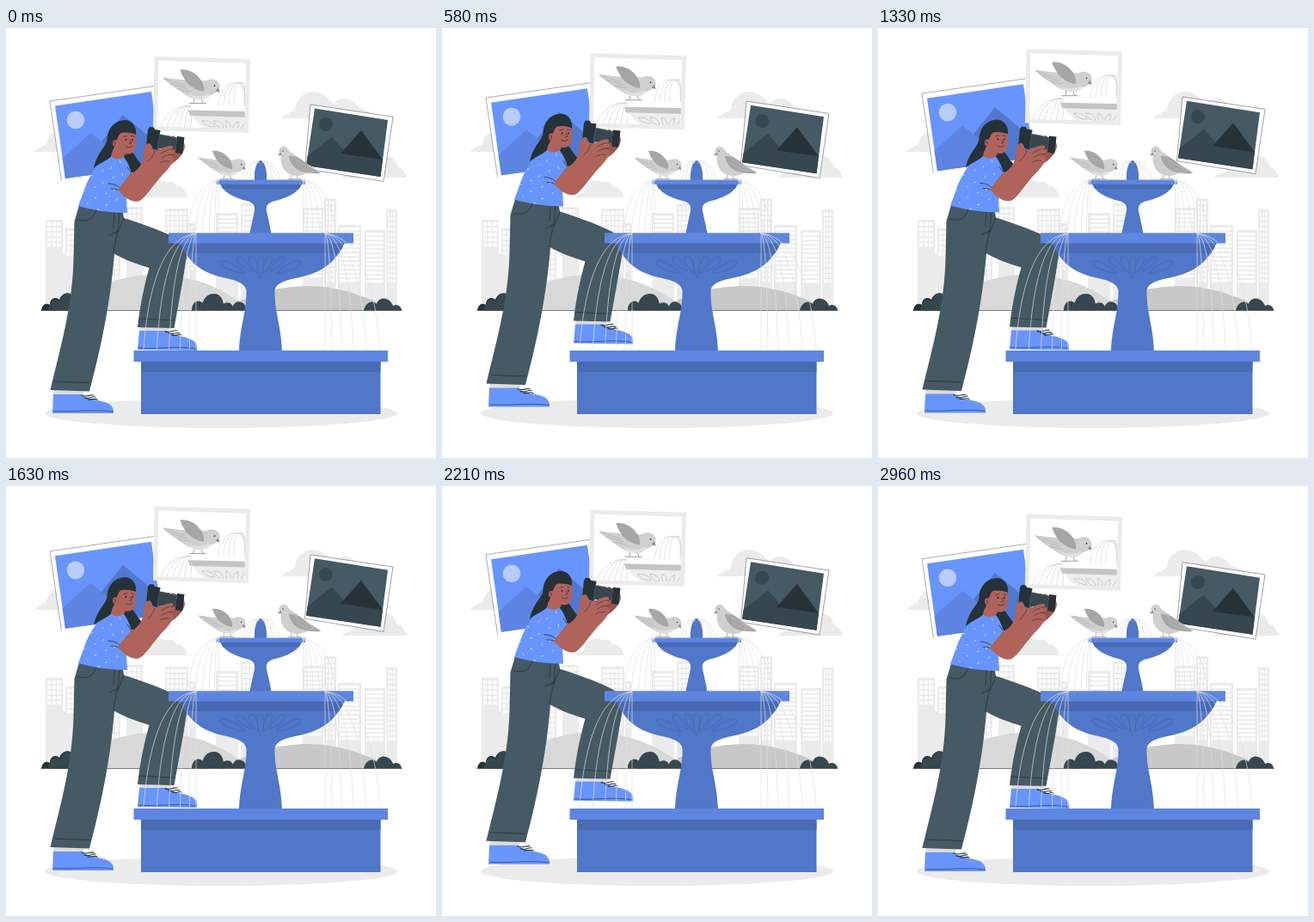
An HTML page with a canvas for the animation above (3 s loop, 500 by 500 pixels).

```html
<!DOCTYPE html>
<html lang="en">
<head>
<meta charset="utf-8">
<title>Photographer at the fountain</title>
<style>
html, body { margin: 0; width: 100%; height: 100%; overflow: hidden; background: #fff; }
canvas { display: block; width: 100%; height: 100%; }
</style>
</head>
<body>
<canvas id="stage"></canvas>
<script>
const canvas = document.getElementById('stage');
const ctx = canvas.getContext('2d');
const ratio = Math.max(1, window.devicePixelRatio || 1);
canvas.width = canvas.height = 500 * ratio;

const LOOP = 3000;
const PALE = '#ebebeb', DARK = '#263238', SLATE = '#37474f', PANTS = '#455a64';
const BLUE = '#6895fd', RIM = '#5e86e0', STONE = '#5077c8', SHADE = '#486bb4';
const SKIN = '#b0635b', WATER = '#e0e0e0';

const cache = {};
const path = d => cache[d] || (cache[d] = new Path2D(d));
function fill(color, d) { ctx.fillStyle = color; ctx.fill(path(d)); }
function line(color, width, d) {
  ctx.strokeStyle = color;
  ctx.lineWidth = width;
  ctx.lineCap = ctx.lineJoin = 'round';
  ctx.stroke(path(d));
}
function rect(color, x, y, w, h) { ctx.fillStyle = color; ctx.fillRect(x, y, w, h); }
function oval(color, x, y, rx, ry = rx) {
  ctx.fillStyle = color;
  ctx.beginPath();
  ctx.ellipse(x, y, rx, ry, 0, 0, Math.PI * 2);
  ctx.fill();
}
function group(dx, dy, draw, clip) {
  ctx.save();
  ctx.translate(dx, dy);
  if (clip) ctx.clip(path(clip));
  draw();
  ctx.restore();
}

// Building with a grid of white windows over a solid foot
function building(x, y, w, cols, rows, step, gap) {
  rect(PALE, x, y, w, 328 - y);
  const cell = (w - 3) / cols;
  for (let r = 0; r < rows; r++)
    for (let c = 0; c < cols; c++)
      rect('#fff', x + 2 + c * cell, y + 3 + r * step, cell - 1.5, step - gap);
}

function clouds() {
  fill(PALE, 'M33 144C36 139 43 138 47 135C49 124 57 119 66 121C78 105 98 110 102 124L120 144Z');
  fill(PALE, 'M155 197C158 192 163 193 165 191C167 180 177 173 187 180C191 177 196 179 198 184C204 183 211 190 211 197Z');
  fill(PALE, 'M320 105C324 99 331 99 336 95C337 77 356 68 371 79C376 83 378 86 381 88C389 78 404 81 409 92C416 95 427 98 433 105Z');
  fill(PALE, 'M391 174C394 169 402 169 406 166C409 150 424 141 440 148C450 148 454 155 455 161C461 163 465 169 466 174Z');
}

function city() {
  rect(PALE, 46, 262, 74, 66);
  building(46, 223, 20, 3, 5, 6, 1.8);
  building(69, 233, 13, 2, 5, 6, 1.8);
  building(120, 225, 13, 2, 11, 6, 1.8);
  building(140, 208, 19, 3, 6, 6, 1.8);
  building(185, 210, 27, 5, 12, 6, 1.8);
  building(213, 227, 7, 1, 9, 6, 1.8);
  building(244, 215, 26, 1, 14, 5, 1.8);
  building(273, 204, 17, 3, 14, 6, 1.8);
  building(345, 209, 24, 1, 16, 5, 1.8);
  building(370, 198, 14, 3, 16, 6, 1.8);
  building(386, 229, 27, 1, 13, 5, 1.8);
  building(417, 235, 24, 1, 12, 5, 1.8);
  building(442, 211, 13, 3, 14, 6, 1.8);
  fill('#d8d8d8', 'M80 328C110 295 140 286 176 287C225 289 250 302 285 328Z');
  fill('#c8c8c8', 'M253 328C284 309 312 301 350 300C390 300 420 313 450 328Z');
  line(SLATE, 0.7, 'M41 328.5H460');
  fill(DARK, 'M41 328.5C42 321 47 319 51 322C51 314 58 312 62 316C65 307 74 306 78 313L82 328.5Z');
  fill(SLATE, 'M49 328.5C50 317 58 312 63 318C66 306 75 306 79 313V328.5Z');
  fill(SLATE, 'M228 328.5C227 314 235 309 242 309C250 309 254 317 253 328.5Z');
  fill(SLATE, 'M216 328.5C216 316 226 315 230 321L234 328.5Z');
  fill(SLATE, 'M249 328.5C250 317 262 317 264 324C266 315 279 317 280 328.5Z');
  fill(SLATE, 'M416 328.5C418 318 427 316 431 321C433 312 446 312 450 323C455 320 460 324 460 328.5Z');
}

function pecker() {
  line('#9a9a9a', 0.8, 'M254 170L253 175M249 175.5H257M260 170L262 175M257 175.5H265');
  fill('#cfcfcf', 'M223 150.5C231 151 239 153 246 153L258 152C262 154 265 154 268 152.5C274 151 279 155 278.5 160C277 165 273 166 269 168C263 173 252 172 245 167C239 163 230 158 223 150.5Z');
  fill('#e0e0e0', 'M246 165C253 169 260 170 267 166L270 167C266 172 259 173 253 171Z');
  fill('#a6a6a6', 'M240 143C246 142 253 145 257 149C261 153 264 159 263 164C256 163 249 159 245.5 154C243 150 241 147 240 143Z');
  line('#aaa', 0.5, 'M225 152L245 158M231 156L247 161M238 161L250 164');
  fill('#888', 'M277 160.5L278.5 165L274.5 163.5Z');
  oval(DARK, 273.5, 158.5, 0.7);
}

function watcher() {
  line('#9a9a9a', 0.8, 'M332 170L331 175.5M328 175.5H335M338 170L339 175.5M336 175.5H343');
  fill('#cfcfcf', 'M317.5 144.5C317 137.5 325 135.5 328 141C331 146 340 149 347 156L367 168L352 168C346 172 335 174 328 169C320 163 318.5 155 320 149Z');
  fill('#a6a6a6', 'M329 149C339 148 347 155 353 161L366 169C351 170 338 167 333 159C331 156 329 152 329 149Z');
  line('#c8c8c8', 0.5, 'M337 157C344 164 351 166 359 167M337 153C345 157 351 162 358 166');
  fill('#7189bd', 'M319 145L315.5 148.5L321 147.5Z');
  oval(DARK, 322, 143, 0.7);
}

function bluePhoto() {
  fill('#fff', 'M51 85L173 67.5L187 163L65 180Z');
  line(DARK, 0.4, 'M64.5 177L51 85L173 67.5');
  group(0, 0, () => {
    rect(BLUE, 40, 60, 160, 130);
    oval('#b9cdfd', 81, 107, 10.3);
    fill('#5377cc', 'M95 152L136 101L190 146V190H90Z');
    fill('#5d84e0', 'M62 155L98 122L140 155L180 170V190H62Z');
  }, 'M57 90.5L169 74L181 159L69 175Z');
}

function darkPhoto() {
  fill('#fff', 'M354 89L450 103.3L439 178L347.5 163Z');
  line(DARK, 0.45, 'M347.5 163L354 89L450 103.3L439 178Z');
  group(0, 0, () => {
    rect(PANTS, 340, 80, 110, 100);
    oval(SLATE, 372, 112, 8);
    fill(SLATE, 'M349 150L379 126.5L396 146L440 153V180H345Z');
    fill(DARK, 'M389 146L413 119L438 153Z');
  }, 'M359 93.5L444 107L435.5 173L349 160Z');
}

function greyPhoto() {
  fill(PALE, 'M172.5 33L284 36L282 122L171 119Z');
  fill('#fff', 'M177.5 38L279 41L277.5 117L176 114.5Z');
  group(0, 0, () => {
    fill('#ededed', 'M217 102L280 104V120H242C231 117 222 111 217 102Z');
    fill('#c4c4c4', 'M212 95.5L280 97V104L214 102Z');
    line('#bbb', 0.7, 'M228 108C236 107 242 111 243 115C236 115 230 112 228 108ZM242 108C248 107 253 112 253 117C247 116 243 113 242 108ZM256 108C261 109 262 114 260 119C256 117 255 112 256 108ZM270 109C264 111 263 116 265 119C270 117 271 113 270 109ZM279 109L272 118');
    for (let i = 0; i < 6; i++) {
      const x = 179 + i * 7;
      line('#d2d2d2', 0.7, `M214 91C${204 + i * 2} 88 ${x + 4} 99 ${x} 118`);
    }
    for (let i = 0; i < 4; i++) {
      line('#d6d6d6', 0.7, `M${268 + i * 3} 64C${258 + i * 3} 62 ${249 + i * 5} 72 ${247 + i * 6} 90`);
      line('#d6d6d6', 0.7, `M${270 + i} 64C${275 + i * 2} 65 ${279 - i} 74 ${280 - i} 90`);
    }
    ctx.translate(182, 57);
    ctx.scale(1.2, 1.2);
    ctx.translate(-223, -150);
    pecker();
  }, 'M177.5 38L279 41L277.5 117L176 114.5Z');
}

const SHIRT = 'M121 147C107 154 96 173 90 191L84 207C101 212 123 215 141 215L140 194L130 187L146 169C143 158 138 149 132 146Z';

function legs() {
  fill('#dcdcdc', 'M56 419H91L90 427H55Z');
  fill(BLUE, 'M55 426H88C92 431 105 432 115 435C122 437 126 442 125 448H54Z');
  line(DARK, 0.6, 'M56 445.5C80 447 98 443 124 446');
  line(DARK, 1.1, 'M88 427C94 430 98 426 102 427M91 430C97 432 100 428 104 429M95 432C100 433 103 430 106 432');
  fill('#dcdcdc', 'M156 346H192V353H155Z');
  fill(BLUE, 'M155 352H187C194 358 207 358 215 362C221 365 223 369 222 375L153 374Z');
  line(DARK, 0.6, 'M154 372C178 374 198 369 221 373');
  line(DARK, 1.1, 'M185 353C191 355 195 351 199 352M189 355C194 357 198 353 202 355M193 357C198 359 201 355 204 357');
  fill(PANTS, 'M120 212L136 214L137 221C156 227 179 235 195 243C207 249 212 255 211 263L195.5 349L153 348C156 320 162 295 166.5 279C150 274 135 268 125 262Z');
  fill(PANTS, 'M85 206.5L133 214L126 262C122 318 109 378 97 422.5L51.5 421C63 373 77 325 78.5 270C79 254 79 245 79.5 225Z');
  line(DARK, 0.8, 'M57 411L97 412.5M156 338L195 340M83 223C95 226 102 222 105 211M132 214C130 225 133 233 127 240M126 213L125 232M137 221L131 236L120 241M131 236C127 245 126 254 125 262');
}

function torso() {
  fill(DARK, 'M136 137C148 141 151 152 157 158C160 164 159 171 155 173C143 168 132 156 131 145Z');
  fill(BLUE, SHIRT);
  group(0, 0, () => {
    for (let i = 0; i < 24; i++) {
      const x = 86 + (i * 23.6) % 58, y = 151 + i * 2.6, a = 0.6 + i * 1.9;
      line('#e4ecff', 0.8, `M${x} ${y}l${2 * Math.cos(a)} ${2 * Math.sin(a)}`);
    }
  }, SHIRT);
  line(DARK, 0.8, 'M119 181C126 181 131 184 137 190M122 187C129 187 134 189 138 194M141 162L146 169L131 187');
}

function head() {
  fill(DARK, 'M119 124C118 139 107 141 102 163C109 156 119 155 125 146L136 140L130 118Z');
  fill(SKIN, 'M126 134L122 149C127 154 136 153 139 147Z');
  fill(SKIN, 'M126 119C136 115 150 116 150.5 124C152 134 151 144 145 146C138 148 130 144 127 137Z');
  fill(DARK, 'M118 137C115 118 126 107 139 107C148 108 152 116 151 124C147 122 141 121 134 122C130 124 130 130 127 133C126 140 124 143 121 147Z');
  oval(SKIN, 127, 134, 3, 3.8);
  oval(DARK, 139.5, 130, 0.9, 1.2);
  oval(DARK, 147, 130, 0.8, 1.2);
  line(DARK, 0.7, 'M137 126.5L141 125.5M145.5 125.5L149 126.5M144 130L146 134L143.5 134.5');
  line(DARK, 0.8, 'M139 137.5C141.5 139.5 144 139.5 146.5 137.5M125.5 133C128 132 128 135 126.5 136');
}

function cameraAndArms() {
  fill('#9c554e', 'M184 163C198 156 207 147 208 138L206 129L195 134L188 151Z');
  fill(SKIN, 'M184 130L187 125L190 125L191 128L194 125L197 127L199 132Z');
  fill(SLATE, 'M176 123L199 127.5L197 141L175 140Z');
  fill(DARK, 'M199 126L207.5 127L205 146.5L197 145Z');
  fill(DARK, 'M165 118L167 115L172 115.5L173 118L179.5 119L176 142L163 138Z');
  line('#5c6b73', 0.6, 'M179 121L176 141M181 124L197 128');
  fill(SKIN, 'M130 188L146 169C154 166 160 156 160 147C160 139 164 132 168 135C171 138 170 143 173 143C180 141 188 136 193 137C196 140 193 142 187 143.5L194 142C197 144 195 147 189 148C194 148 196 151 194 156C188 166 181 171 176 178C168 187 161 199 154 201.5C146 203 137 197 130 188Z');
  line(DARK, 0.6, 'M193 141.5C187 142 184 143 180 146M194 147C188 147 185 149 181 151M190 155C186 154 183 155 179 157M173 143C171 149 169 152 165 155');
}

function petals(x, y) {
  for (const [angle, from, to] of [[0, 3, 28], [23, 8, 30], [46, 15, 38], [66, 20, 51]])
    for (const side of angle ? [-1, 1] : [1]) {
      ctx.save();
      ctx.translate(x, y);
      ctx.rotate(side * angle * Math.PI / 180);
      line(SHADE, 0.9, `M0 ${-from}C-4 ${-from - 7} -6 ${-to} 0 ${-to}C6 ${-to} 4 ${-from - 7} 0 ${-from}Z`);
      ctx.restore();
    }
}

function fountain() {
  fill(STONE, 'M289 177C288 165 292 154 296 154C300 154 304 165 303 177Z');
  fill(STONE, 'M249 181H344C340 191 329 197 313 201C304 203 302 207 303 213C305 222 307 230 308.5 239H283.5C285 230 287 222 289 213C290 207 288 203 280 201C264 197 253 191 249 181Z');
  fill(SHADE, 'M249 181H344L341 187H252Z');
  rect(RIM, 244.5, 176.5, 103.5, 5.3);
  fill(STONE, 'M202 249H394C386 268 371 284 341 290C321 294 313 298 312.5 306C312 330 320 346 321 376H271C272 346 280 330 279.5 306C279 298 271 294 252 290C224 284 210 268 202 249Z');
  fill(SHADE, 'M202 249H394C392 254 390 258 387 262H209C206 258 204 254 202 249Z');
  petals(296, 293);
  rect(RIM, 189, 238.3, 215, 12);
  rect(STONE, 157, 387, 278.5, 62);
  rect(SHADE, 157, 387, 278.5, 13);
  rect(RIM, 148.5, 375, 295.5, 13);
}

// Streams from one lip, spreading wider the further out they land
function fall(x0, y0, near, far, y, count) {
  for (let i = 0; i < count; i++) {
    const end = near + (far - near) * Math.pow(i / (count - 1), 1.3);
    const reach = end - x0, mid = y0 + (y - y0) * 0.38;
    line(WATER, 0.7, `M${x0} ${y0}C${x0 + reach * 0.55} ${y0 + 2} ${x0 + reach * 0.9} ${mid} ${end} ${y}`);
  }
}

function water() {
  for (let i = 0; i < 3; i++) {
    line(WATER, 0.7, `M294 ${155 + i}C${284 + i * 2} 153 ${277 + i * 4} 163 ${275 + i * 4} 176`);
    line(WATER, 0.7, `M298 ${155 + i}C${308 - i * 2} 153 ${316 - i * 4} 163 ${318 - i * 4} 176`);
  }
  fall(247, 177, 247, 211, 238, 6);
  fall(345, 177, 346, 383, 238, 6);
  fall(221, 239, 221, 160, 373, 6);
  fall(371, 239, 371, 435, 373, 6);
}

function draw(ms) {
  const t = ms % LOOP / LOOP;
  const drift = -10 * (1 - Math.abs(1 - 2 * t));
  const bob = -4.1 * (1 - Math.cos((t * 2 + 0.025) * Math.PI * 2));
  ctx.setTransform(ratio, 0, 0, ratio, 0, 0);
  rect('#fff', 0, 0, 500, 500);
  oval(PALE, 250, 448, 205, 17);
  clouds();
  city();
  group(0, drift, () => { bluePhoto(); darkPhoto(); greyPhoto(); });
  group(0, bob, () => { legs(); torso(); head(); cameraAndArms(); });
  fountain();
  water();
  pecker();
  watcher();
}

let start = null;
function frame(now) {
  if (start === null) start = now;
  draw(now - start);
  requestAnimationFrame(frame);
}
draw(0);
requestAnimationFrame(frame);
</script>
</body>
</html>
```
